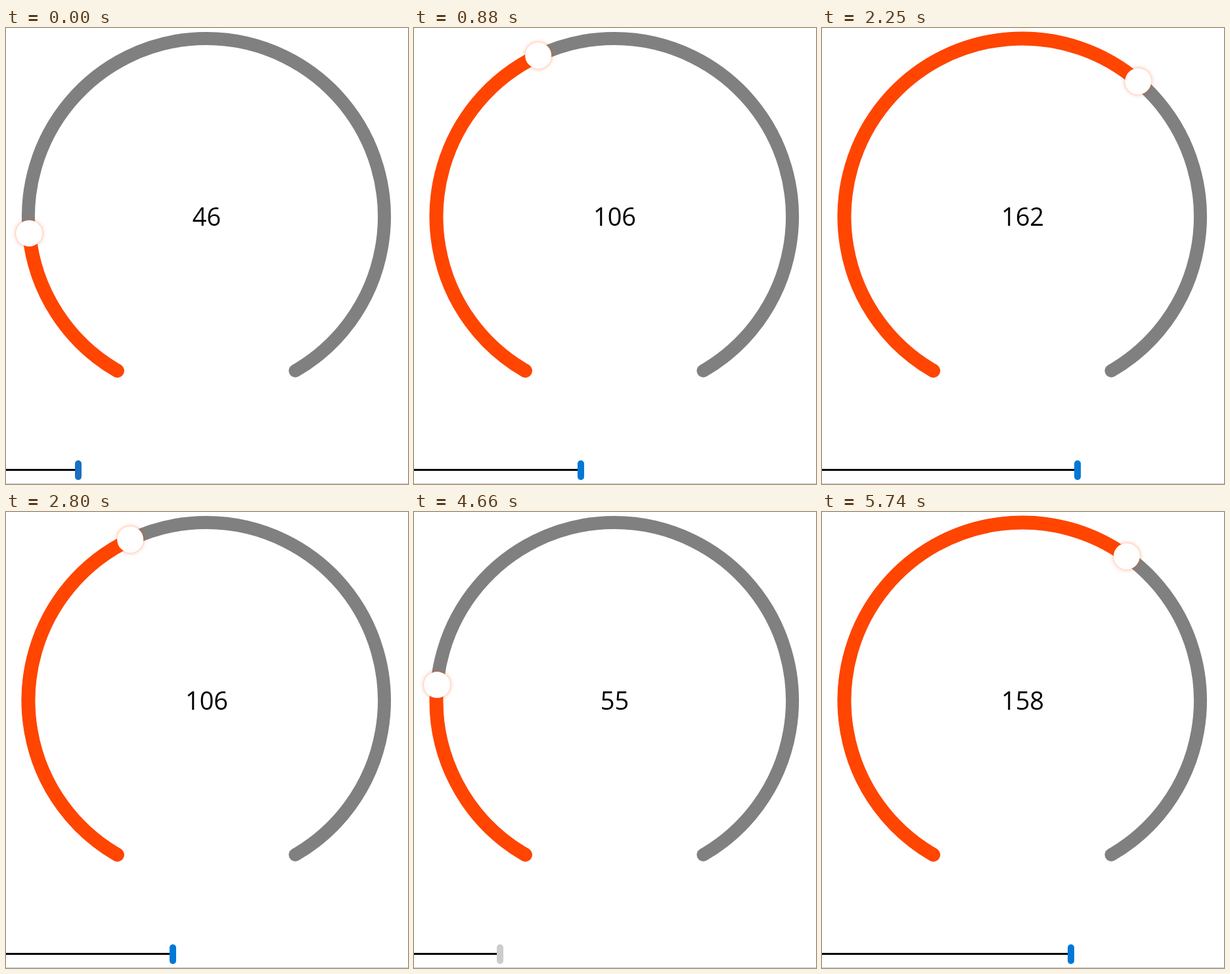
Animation of 612x694 px, one loop 6.38 s. Source, as an HTML page:

```html
<!DOCTYPE html>
<html lang="en">
<head>
<meta charset="utf-8">
<title>Radial gauge</title>
<style>
  html, body { margin: 0; width: 100%; height: 100%; overflow: hidden; background: #fff; }
  svg { display: block; width: 612px; height: 694px; }
  .arc { fill: none; stroke-linecap: round; }
  #knob { fill: #fff; filter: drop-shadow(0 0 3px rgba(255, 69, 0, .5)); }
  #label { font: 38px "Open Sans", "Noto Sans", sans-serif; text-anchor: middle; }
</style>
</head>
<body>
<svg viewBox="0 0 612 694">
  <path class="arc" d="M169.5 521.7A271 271 0 1 1 440.5 521.7" stroke="#808080" stroke-width="20"/>
  <path class="arc" id="fill" d="M169.5 521.7A271 271 0 1 1 440.5 521.7" pathLength="255" stroke="#ff4500" stroke-width="21"/>
  <circle id="knob" r="20"/>
  <text id="label" x="305.5" y="301"></text>
  <rect id="bar" y="671" height="3"/>
  <rect id="thumb" y="658" width="10" height="30" rx="5"/>
  <rect y="693" width="612" height="1" fill="#c8c8c8"/>
</svg>
<script>
const LOOP = 6380, MAX = 255, CX = 305, CY = 287, R = 271;
const REST = 46.4, STEP = 77.5, SLACK = 12;
const HOVER = "#1a70c2", ACCENT = "#0078d7", PRESSED = "#ccc";

// Each drag moves in even steps through a few [step, value] points
const drags = [
  { start: 170, path: [[0, 51], [9, 106], [19, 182], [21, 188]] },
  { start: 1950, path: [[0, 184], [4, 162], [12, 98]] },
  { start: 3890, path: [[0, 98], [10, 55.3], [12, 56], [22, 158]] }
];

const $ = id => document.getElementById(id);
const fill = $("fill"), knob = $("knob"), label = $("label"), bar = $("bar"), thumb = $("thumb");

function along(path, step) {
  const i = path.findIndex(p => p[0] > step);
  if (i < 0) return path[path.length - 1][1];
  const [s0, v0] = path[i - 1], [s1, v1] = path[i];
  return v0 + (v1 - v0) * (step - s0) / (s1 - s0);
}

function valueAt(t) {
  const drag = drags.findLast(d => d.start <= t);
  return drag ? along(drag.path, Math.floor((t - drag.start + SLACK) / STEP)) : REST;
}

function tintAt(t) {
  if (t < drags[0].start) return HOVER;
  return t >= drags[2].start && t < 5740 ? PRESSED : ACCENT;
}

function draw(t) {
  const v = valueAt(t), shown = Math.floor(v);
  const angle = (30 + v * 300 / MAX) * Math.PI / 180;
  const x = Math.round(shown * 2.404 - .8);
  fill.setAttribute("stroke-dasharray", v + " 999");
  knob.setAttribute("cx", CX - R * Math.sin(angle));
  knob.setAttribute("cy", CY + R * Math.cos(angle));
  label.textContent = shown;
  bar.setAttribute("width", x);
  thumb.setAttribute("x", x - 5);
  thumb.setAttribute("fill", tintAt(t));
}

const begin = performance.now();
function frame() {
  draw((performance.now() - begin) % LOOP);
  requestAnimationFrame(frame);
}
frame();
</script>
</body>
</html>
```
